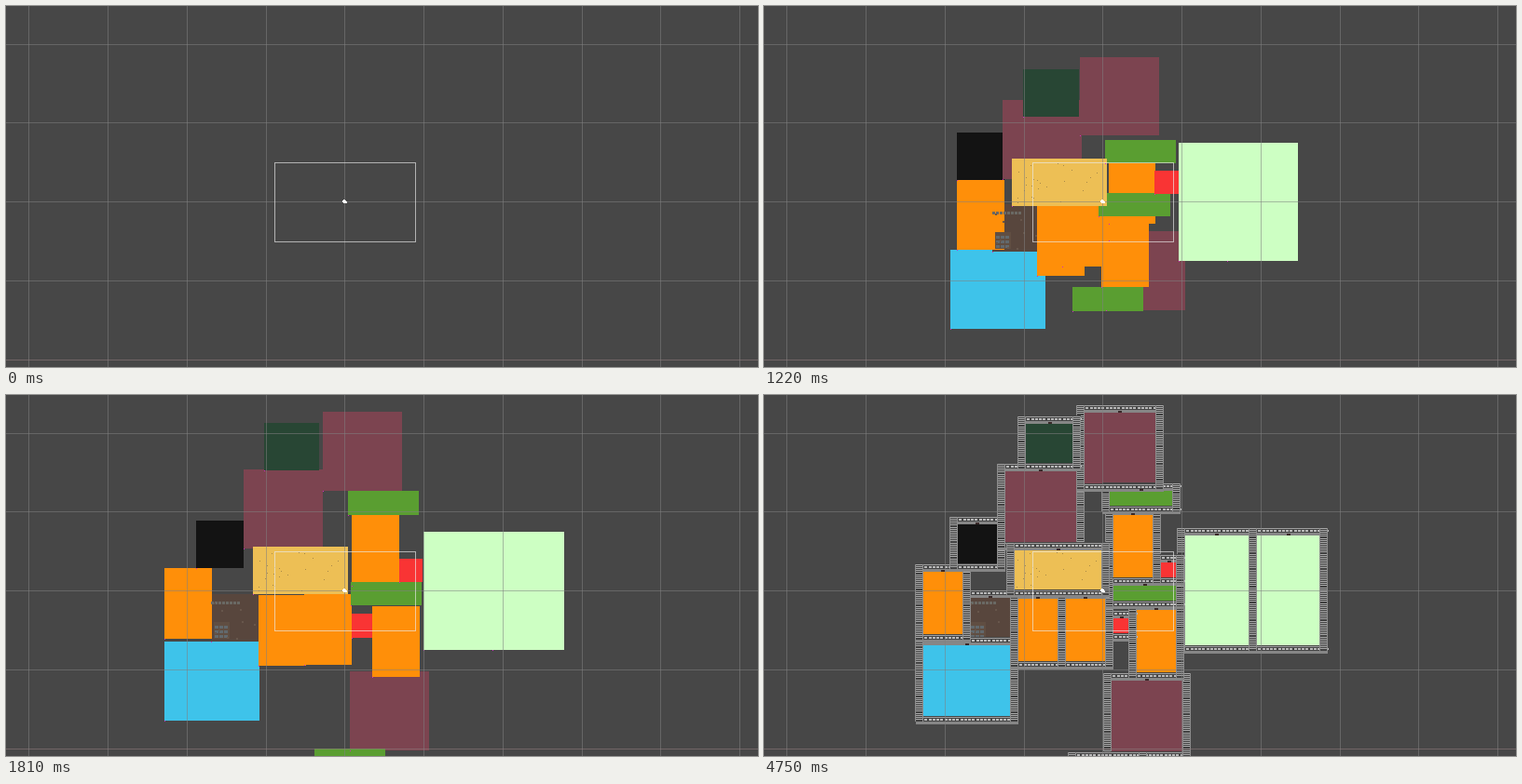
Animation of 807x388 px, one loop 4.82 s. Source, as an HTML page with a canvas:

```html
<!DOCTYPE html>
<html lang="en">
<head>
<meta charset="utf-8">
<title>Room layout generator</title>
<style>
html, body { margin: 0; width: 100%; height: 100%; overflow: hidden; background: #474747; }
canvas { display: block; }
</style>
</head>
<body>
<canvas id="stage" width="807" height="388"></canvas>
<script>
const ctx = document.getElementById('stage').getContext('2d');
const LOOP = 4820, TILE = 8.477, STEP = 65.7, FIRST = 1085;
const SPREAD_FROM = 1020, SPREAD_TO = 1900;

// exponents of the spreading curve: small ones arrive at once
const SNAP = .02, BRISK = .2, SLOW = .4, LATE = .8;

const kind = (w, h, color) => ({ w: w * TILE, h: h * TILE, color });
const HALL = kind(10, 10, '#7c4450');
const MEADOW = kind(9, 15, '#cdffc3');
const POOL = kind(12, 10, '#3ec3ea');
const DEN = kind(6, 6, '#58463d');
const OFFICE = kind(6, 9, '#ff8f09');
const STRIP = kind(9, 3, '#5a9e31');
const CLOSET = kind(3, 3, '#f93434');
const VAULT = kind(6, 6, '#131313');
const GROVE = kind(7, 6, '#284634');
const SAND = kind(12, 6, '#edbf55');

const rooms = [];

// x, y: where the room settles
function room(type, x, y, pace = BRISK) {
  const center = type.w === MEADOW.w ? 364 : 347;
  const from = { x: center - type.w / 2, y: 210.5 - type.h / 2 };
  const dx = x - from.x, dy = y - from.y;
  const wide = Math.abs(dx) > Math.abs(dy) * 1.1;
  // the shorter way is cleared first
  const r = { ...type, from, dx, dy, paceX: wide ? pace : SNAP, paceY: wide ? SNAP : pace };
  rooms.push(r);
  return r;
}

// in drawing order
room(CLOSET, 371, 236);
room(HALL, 369, 303, SLOW);
room(MEADOW, 448.3, 147, SNAP);
room(MEADOW, 448.3 + MEADOW.w, 147, BRISK / 2);
room(POOL, 167, 265);
const den = room(DEN, 218, 214);
room(OFFICE, 167, 186);
room(OFFICE, 269, 215, SLOW);
room(OFFICE, 269 + OFFICE.w, 215);
room(OFFICE, 371, 125, LATE);
room(OFFICE, 396, 227, SLOW);
room(STRIP, 367, 99, SLOW);
room(STRIP, 371, 201);
room(STRIP, 331, 388, SLOW);
room(CLOSET, 422, 176, SNAP);
room(VAULT, 204, 135, SNAP);
room(HALL, 255, 78);
room(HALL, 340, 15);
room(GROVE, 277, 27);
const sand = room(SAND, 265, 163, SNAP);

function seeded(seed) {
  return () => (seed = (seed * 16807) % 2147483647) / 2147483647;
}

function box(color, x, y, w, h) {
  ctx.fillStyle = color;
  ctx.fillRect(Math.round(x), Math.round(y), w, h);
}

function place(r, t) {
  const u = Math.max(0, Math.min(1, (t - SPREAD_FROM) / (SPREAD_TO - SPREAD_FROM)));
  r.x = r.from.x + r.dx * u ** r.paceX;
  r.y = r.from.y + r.dy * u ** r.paceY;
}

function edges(r) {
  return [r.x, r.y, r.x + r.w, r.y + r.h].map(Math.round);
}

function floor(r) {
  const [left, top, right, bottom] = edges(r);
  box(r.color, left, top, right - left, bottom - top);
}

function specks(r, count, color, seed, size) {
  const random = seeded(seed);
  for (let i = 0; i < count; i++) {
    box(color, r.x + 3 + random() * (r.w - 7), r.y + 4 + random() * (r.h - 8), size, size);
  }
}

function furniture() {
  const { x, y } = den;
  for (let i = 0; i < 8; i++) box('#6a6964', x + i * 4, y + 8, 3, 3);
  box('#604e42', x + 3, y + 30, 17, 18);
  for (let i = 0; i < 9; i++) {
    box('#62696d', x + 4 + i % 3 * 5, y + 34 + Math.floor(i / 3) * 5, 4, 3);
  }
  specks(den, 9, '#67564b', 77, 2);
}

function sideWall(x, top, bottom) {
  box('#424242', x - 5, top, 9, bottom - top);
  for (let y = top; y < bottom - 1; y += TILE / 4) box('#a8a8a8', x - 4, y, 7, 1);
  box('#8c8c8c', x - 5, top, 1, bottom - top);
  box('#8c8c8c', x + 3, top, 1, bottom - top);
}

function crossWall(y, left, right) {
  box('#454545', left, y - 5, right - left, 6);
  box('#a0a0a0', left, y - 4, right - left, 1);
  for (let x = left + 1; x < right - 2; x += TILE / 2) box('#b8b8b8', x, y - 2, 3, 2);
  box('#868686', left, y + 1, right - left, 3);
}

function walls(r) {
  const [left, top, right, bottom] = edges(r);
  for (const y of [top, bottom]) crossWall(y, left - 4, right + 4);
  for (const x of [left, right]) sideWall(x, top - 4, bottom + 1);
}

function grid() {
  const line = 'rgba(128,128,128,.55)';
  for (let x = 24.2; x < 807; x += 84.77) box(line, x, 0, 1, 388);
  for (let y = 40.6; y < 300; y += 84.7) box(line, 0, y, 807, 1);
  box('rgba(142,122,124,.6)', 0, 380, 807, 1);
}

function overlay() {
  ctx.strokeStyle = 'rgba(235,235,235,.65)';
  ctx.strokeRect(288.5, 168.5, 151, 85);
  box('#fff', 361, 209, 4, 2);
  box('#fff', 362, 208, 2, 4);
  box('#fff', 364, 210, 2, 2);
}

function layout(t) {
  const at = t < 1100 ? 0 : FIRST + STEP * Math.floor((t - FIRST) / STEP);
  for (const r of rooms) {
    place(r, at);
    floor(r);
  }
  specks(sand, 24, '#a88a48', 4211, 1);
  furniture();
  if (at && t < 4070) {
    for (const r of rooms) box('#d02ac0', r.x, r.y + r.h, 1, 1);
  }
  if (t >= 4200) {
    const built = Math.min(1, (1 + Math.floor((t - 4200) / 74)) / 6);
    rooms.slice(0, Math.ceil(rooms.length * built)).forEach(walls);
  }
  if (t >= 4680) {
    for (const r of rooms) box('#3a2a2a', r.x + r.w / 2 - 2, r.y + 2, 4, 2);
  }
}

function draw(t) {
  box('#474747', 0, 0, 807, 388);
  if (t >= 790) layout(t);
  grid();
  overlay();
}

const start = performance.now();
function tick() {
  draw((performance.now() - start) % LOOP);
  requestAnimationFrame(tick);
}
tick();
</script>
</body>
</html>
```
